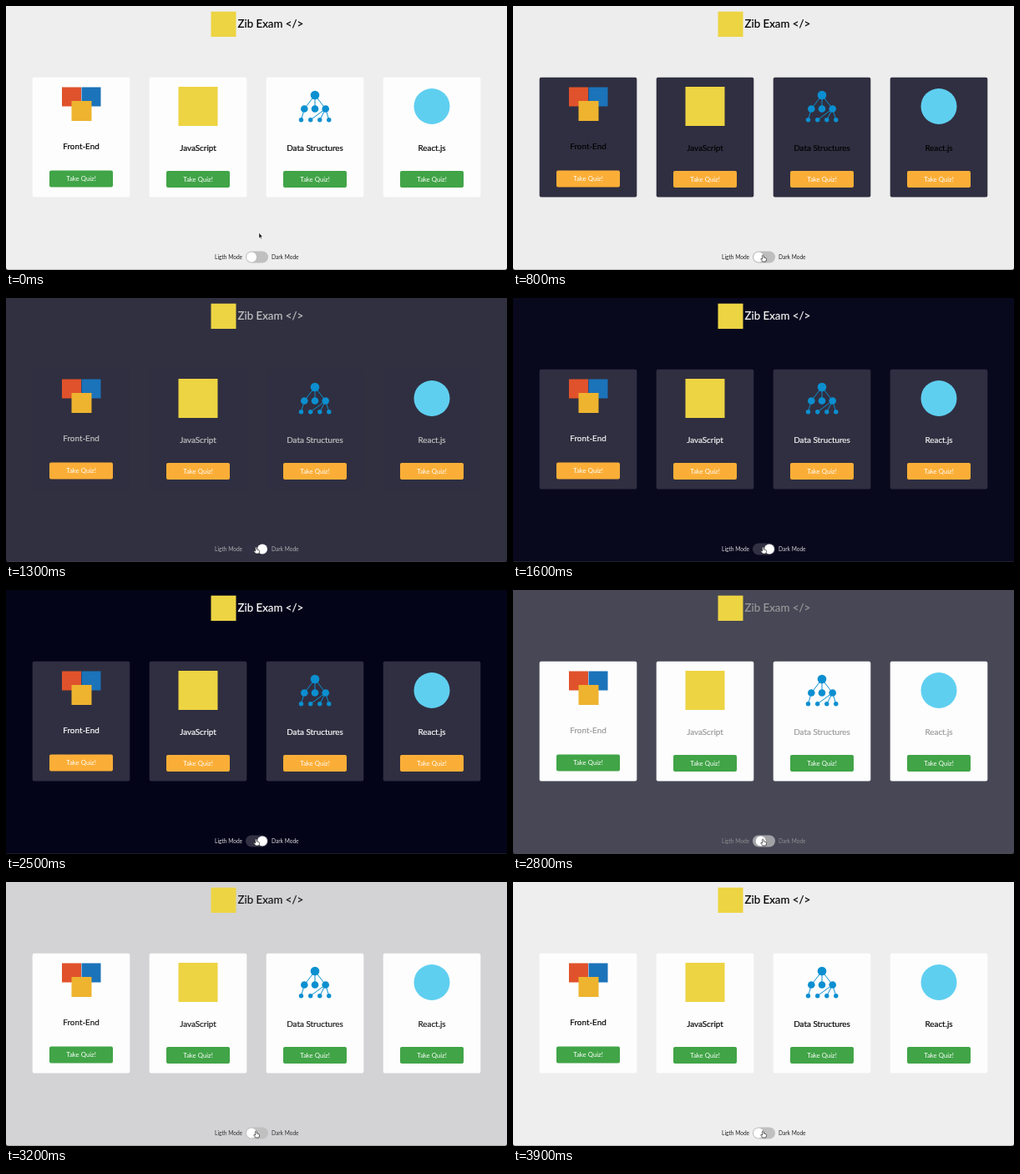
An HTML page for the animation above (4000 ms loop, 600 by 317 pixels).

```html
<!DOCTYPE html>
<html lang="en">
<head>
<meta charset="utf-8">
<title>Quiz theme switch</title>
<style>
  html, body { margin: 0; width: 100%; height: 100%; overflow: hidden; }
  svg { display: block; width: 600px; height: 317px; font-family: Lato, "Open Sans", sans-serif; }
  .ink { fill: currentColor; }
  .heading { stroke: currentColor; stroke-width: .18; }
  .card { fill: var(--card); }
  .button { fill: var(--button); }
  .middle { text-anchor: middle; }
</style>
</head>
<body>
<svg id="stage" viewBox="0 0 600 317">
  <rect id="page" width="600" height="317"/>
  <rect x="245.5" y="6.7" width="30" height="30.3" fill="#edd443"/>
  <text class="ink heading" x="277.5" y="26" font-size="13.3">Zib Exam &lt;/&gt;</text>

  <g id="cards"></g>

  <g id="frontEnd">
    <rect x="67" y="97.5" width="23" height="23" fill="#e0522b"/>
    <rect x="90.5" y="97.5" width="23" height="23" fill="#1b73ba"/>
    <rect x="78.5" y="114" width="24" height="24" fill="#eeb32f"/>
  </g>
  <rect x="206.5" y="97" width="47" height="47" fill="#edd443"/>
  <g id="tree" fill="#0b8fd0" stroke="#0b8fd0"></g>
  <circle cx="510" cy="120.5" r="21.5" fill="#5fcff0"/>

  <g class="ink" font-size="6.6" opacity=".85">
    <text x="250" y="303.8">Ligth Mode</text>
    <text x="318" y="303.8">Dark Mode</text>
  </g>
  <rect id="track" x="287" y="294.5" width="27" height="14" rx="7"/>
  <circle id="knob" cy="301.5" r="6" fill="#fff"/>

  <path id="arrow" d="M0 0V6.2L1.4 5L2.3 7.1L3.3 6.7L2.4 4.6H4.2Z" fill="#111" stroke="#fff" stroke-width=".4"/>
  <path id="hand" d="M-1 .6Q0-.5 .7.6L1 3L3.6 3.8Q4.4 4.2 4 5.6L3.3 8H-.3L-2.7 5.2Q-2.8 4.1-1.7 4.4L-.7 5Z"
        fill="#fff" stroke="#222" stroke-width=".7"/>
  <path d="M0 314V317H3Q0 317 0 314M600 314V317H597Q600 317 600 314" fill="#000"/>
  <rect y="316.4" width="600" height=".6" fill="#555" opacity=".5"/>
</svg>
<script>
const LOOP = 4000, TO_DARK = 790, TO_LIGHT = 2605;
const $ = id => document.getElementById(id);
const clamp = v => Math.min(1, Math.max(0, v));

$('cards').innerHTML = ['Front-End', 'JavaScript', 'Data Structures', 'React.js'].map((name, i) => {
  const x = 90 + 140 * i, dy = i ? 0.6 : 0;
  return `<rect class="card" x="${x - 58.3}" y="85.7" width="116.6" height="143.8" rx="2"/>
    <text class="ink heading middle" x="${x}" y="${i ? 174.3 : 171.8}" font-size="9.9">${name}</text>
    <rect class="button" x="${x - 38}" y="${197.5 + dy}" width="76" height="20" rx="2"/>
    <text class="middle" x="${x}" y="${210 + dy}" font-size="7.8" fill="#fff">Take Quiz!</text>`;
}).join('');

const nodes = [[370, 107, 5.3], [357.3, 123.5, 4.3], [370, 123.5, 4.3], [382.7, 123.5, 4.3],
  [353.5, 136.7, 2.7], [364.7, 136.7, 2.7], [375.8, 136.7, 2.7], [386.8, 136.7, 2.7]];
const links = [[0, 1], [0, 2], [0, 3], [1, 4], [3, 5], [3, 6], [3, 7]];
$('tree').innerHTML =
  links.map(([a, b]) => `<path d="M${nodes[a].slice(0, 2)}L${nodes[b].slice(0, 2)}"/>`).join('') +
  nodes.map(([x, y, r]) => `<circle cx="${x}" cy="${y}" r="${r}" stroke="none"/>`).join('');

// CSS "ease": cubic-bezier(.25, .1, .25, 1), solved by bisection
function ease(x) {
  if (x <= 0 || x >= 1) return clamp(x);
  const bezier = (a, b, s) => 3 * a * s * (1 - s) ** 2 + 3 * b * s * s * (1 - s) + s ** 3;
  let lo = 0, hi = 1;
  for (let i = 0; i < 20; i++) {
    const mid = (lo + hi) / 2;
    if (bezier(.25, .25, mid) < x) lo = mid; else hi = mid;
  }
  return bezier(.1, 1, lo);
}

// How dark the theme is, 0 to 1
const darkness = (t, duration, on = TO_DARK, off = TO_LIGHT) =>
  ease((t - on) / duration) - ease((t - off) / duration);

const mix = (from, to, k) => `rgb(${from.map((v, i) => Math.round(v + (to[i] - v) * k))})`;

function draw(t) {
  const dark = t >= TO_DARK && t < TO_LIGHT;
  const slide = darkness(t, 400);
  const stage = $('stage');
  stage.style.color = mix([0, 0, 0], [255, 255, 255], darkness(t, 1000, 835, 2555));
  stage.style.setProperty('--card', dark ? '#302f41' : '#fdfdfd');
  stage.style.setProperty('--button', dark ? '#fbae37' : '#41a447');
  $('page').setAttribute('fill', mix([238, 238, 238], [4, 4, 25], darkness(t, 1000)));
  $('track').setAttribute('fill', mix([192, 192, 192], [49, 49, 67], slide));
  $('knob').setAttribute('cx', 294 + 13 * slide);

  const move = ease((t - 100) / 450);
  const x = 303 - 3.5 * move, y = 272.5 + 26.5 * move;
  const hover = y > 294.5;
  for (const [id, shown] of [['arrow', !hover], ['hand', hover]]) {
    $(id).setAttribute('transform', `translate(${x} ${y})`);
    $(id).setAttribute('visibility', shown ? 'visible' : 'hidden');
  }
}

function tick() {
  draw(performance.now() % LOOP);
  requestAnimationFrame(tick);
}
tick();
</script>
</body>
</html>
```
